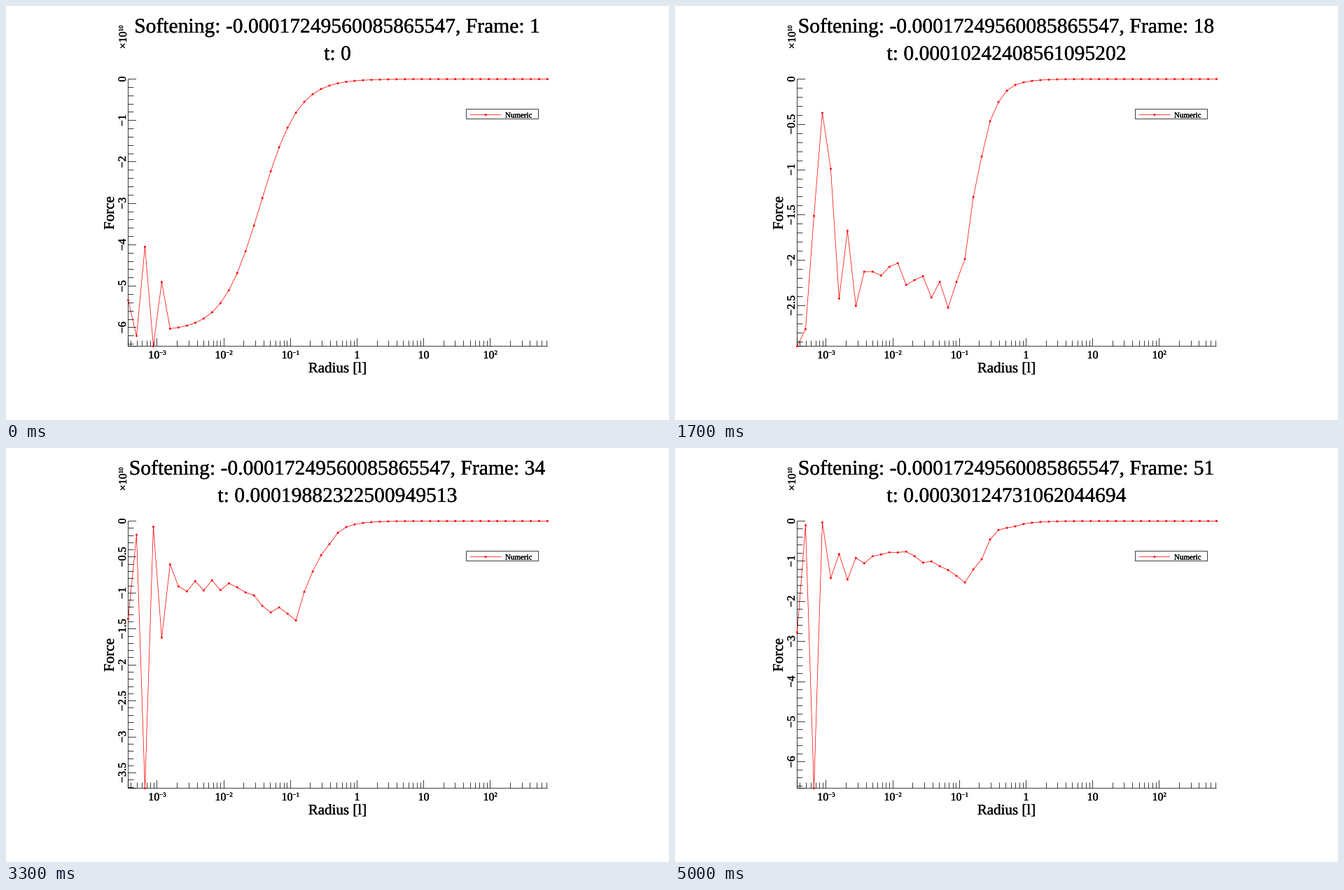
A matplotlib script for the animation above (5100 ms loop, 947 px wide and 592 px high).

```python
import math

import matplotlib.patheffects as effects
import matplotlib.pyplot as plt
import numpy as np
from matplotlib.animation import FuncAnimation
from matplotlib.collections import LineCollection
from matplotlib.patches import Circle, Rectangle

plt.rcParams["font.family"] = "Liberation Serif"

W, H, DPI = 947, 592, 64
PX = 72 / DPI                      # points per pixel
FRAMES, INTERVAL = 51, 100
LEFT, RIGHT, TOP, BOTTOM = 174.5, 773.5, 104.5, 486.5
DEPTH = BOTTOM - TOP
UNIT_X, DECADE = 501.4, 95.15      # pixel of radius 1, pixels per decade
LONG, SHORT = 11.5, 8              # tick lengths
TICK = 16
SMALL = TICK * 0.55
LINE = 0.75 * PX

SAMPLE = np.arange(51)
XS = np.linspace(LEFT, RIGHT, len(SAMPLE))

KEYS = [0, 11, 17, 25, 33, 39, 50]
TIMES = [0.0, 6.627440833649836e-05, 0.00010242408561095202,
         0.00015062365531022358, 0.00019882322500949513,
         0.0002349729022839488, 0.00030124731062044694]

# Force (in 1e10) of the innermost samples at KEYS, one row per sample.
INNER = np.log([
    [5.34, 7.48, 2.948, 1.11, 1.36, 0.55, 2.77],
    [6.20, 3.43, 2.76, 0.43, 0.19, 0.145, 0.105],
    [4.05, 2.07, 1.51, 2.476, 3.713, 5.276, 6.655],
    [6.45, 10.6, 0.374, 0.133, 0.078, 0.055, 0.035],
    [4.90, 3.50, 0.99, 1.09, 1.62, 2.23, 1.42]])

# The smooth outer profile: a few samples at a few moments.
KNOTS = [6, 12, 18, 20, 22, 24, 26]
OUTER = {11: [3.5, 3.3, 3.6, 2.28, 0.96, 0.19, 0.062],
         25: [1.1, 1.1, 1.57, 1.65, 0.73, 0.37, 0.068],
         33: [0.88, 0.86, 1.2, 1.38, 0.7, 0.32, 0.083],
         50: [1.2, 0.75, 1.22, 1.53, 0.95, 0.22, 0.131]}
FALLOFF = math.log(0.56)           # inverse-square drop per sample


def outer_profile(values):
    inside = np.interp(SAMPLE, KNOTS, np.log(values))
    return inside + FALLOFF * np.maximum(SAMPLE - KNOTS[-1], 0)


start = np.log(6.08 / (1 + np.exp(0.44 * (SAMPLE - 15.75))))
outer = np.array([start] + [outer_profile(row) for row in OUTER.values()])
outer_keys = [0, *OUTER]

# Sampling noise, strongest near the centre and absent at the start.
sigma = (0.05 + 0.2 * np.exp((5 - SAMPLE) / 2)) * (SAMPLE < 18)
noise = np.random.default_rng(4).normal(size=(len(KEYS), len(SAMPLE))) * sigma
noise[0] = 0


def blend(i, keys, rows):
    return np.array([np.interp(i, keys, column) for column in np.transpose(rows)])


def force_at(i):
    log_force = blend(i, outer_keys, outer) + blend(i, KEYS, noise)
    log_force[:len(INNER)] = blend(i, KEYS, INNER.T)
    return np.exp(log_force) * 1e10


fig = plt.figure(figsize=(W / DPI, H / DPI), dpi=DPI, facecolor="white")
ax = fig.add_axes([0, 0, 1, 1])
ax.set_xlim(0, W)
ax.set_ylim(H, 0)
ax.axis("off")


def write(x, y, text, size, ha="center", angle=0):
    label = ax.text(x, y, text, fontsize=size * PX, ha=ha, va="baseline",
                    rotation=angle, rotation_mode="anchor", color="black")
    label.set_path_effects([effects.withStroke(linewidth=0.3 * PX,
                                               foreground="black")])
    return label


def add_lines(segments):
    lines = LineCollection(segments, colors="black", linewidths=LINE, snap=False)
    ax.add_collection(lines, autolim=False)
    return lines


def crisp(value):
    """Centre of the pixel that holds value."""
    return math.floor(value) + 0.5


def draw_power(x, exponent):
    sup = str(exponent).replace("-", "\u2212")
    width = TICK + SMALL * (0.5 + 0.564 * (exponent < 0))
    write(x - width / 2, 504, "10", TICK, "left")
    write(x - width / 2 + TICK, 498.5, sup, SMALL, "left")


def draw_x_axis():
    add_lines([[(LEFT, BOTTOM), (RIGHT, BOTTOM)], [(LEFT, TOP), (LEFT, BOTTOM)]])
    ticks = [(LEFT, LONG)]
    for power in range(-4, 3):
        for digit in range(1, 10):
            x = crisp(UNIT_X + DECADE * (power + math.log10(digit)))
            if LEFT < x < RIGHT:
                ticks.append((x, LONG if digit == 1 else SHORT))
    add_lines([[(x, BOTTOM), (x, BOTTOM - size)] for x, size in ticks])
    for power in range(-3, 3):
        x = UNIT_X + DECADE * power
        if power in (0, 1):
            write(x, 504, str(10 ** power), TICK)
        else:
            draw_power(x, power)
    write(W / 2, 524, "Radius [l]", 21)
    write(154, 296, "Force", 21, angle=90)


def draw_legend():
    ax.add_patch(Rectangle((657.5, 147.5), 103, 14, fill=False,
                           edgecolor="black", linewidth=LINE, snap=False))
    ax.plot([663, 707], [155.5, 155.5], color="red", linewidth=LINE, snap=False)
    ax.add_patch(Circle((685, 155.5), 1.5, facecolor="red", linewidth=0))
    write(713, 159.5, "Numeric", 11, "left")


draw_x_axis()
draw_legend()
curve, = ax.plot(XS, np.full(len(XS), TOP), color="red", linewidth=LINE,
                 snap=False)
dots = ax.scatter(XS, np.full(len(XS), TOP), s=np.full(len(XS), (3 * PX) ** 2),
                  color="red", linewidths=0, zorder=3)
y_ticks = add_lines([])
y_labels = [write(171, TOP, "", TICK, angle=90) for _ in range(12)]
write(172, 61.5, "\u00d710", TICK, "left", 90)
scale_power = write(167, 61.5 - 1.564 * TICK, "", SMALL, "left", 90)
title = write(W / 2, 38, "", 29.6)
subtitle = write(W / 2, 77, "", 29.6)


def tick_step(span):
    """Smallest 1-2-5 step giving at most ten divisions, and its minor count."""
    base = 10 ** math.floor(math.log10(span / 10))
    for factor, parts in ((1, 5), (2, 2), (5, 5), (10, 5)):
        if span / (factor * base) <= 10:
            return factor * base, parts


def update_y_axis(span):
    step, parts = tick_step(span)
    minor = step / parts
    segments = [[(LEFT, BOTTOM), (LEFT + LONG, BOTTOM)]]
    for label in y_labels:
        label.set_text("")
    for n in range(int(span / minor + 1e-9) + 1):
        y = TOP + DEPTH * n * minor / span
        major = n % parts == 0
        length = LONG if major else SHORT
        segments.append([(LEFT, crisp(y)), (LEFT + length, crisp(y))])
        if major:
            value = round(n * minor, 6)
            label = y_labels[n // parts]
            label.set_text(f"\u2212{value:g}" if n else "0")
            label.set_y(y)
    y_ticks.set_segments(segments)


def update(i):
    force = force_at(i)
    peak = force.max()
    power = math.floor(math.log10(peak))
    ys = TOP + DEPTH * force / peak
    curve.set_ydata(ys)
    dots.set_offsets(np.column_stack([XS, ys]))
    update_y_axis(peak / 10 ** power)
    scale_power.set_text(str(power))
    time = float(np.interp(i, KEYS, TIMES))
    title.set_text(f"Softening: -0.00017249560085865547, Frame: {i + 1}")
    subtitle.set_text(f"t: {time if i else 0}")
    return []


anim = FuncAnimation(fig, update, frames=FRAMES, interval=INTERVAL,
                     init_func=lambda: update(0), repeat=True, repeat_delay=0)
plt.show()
```
